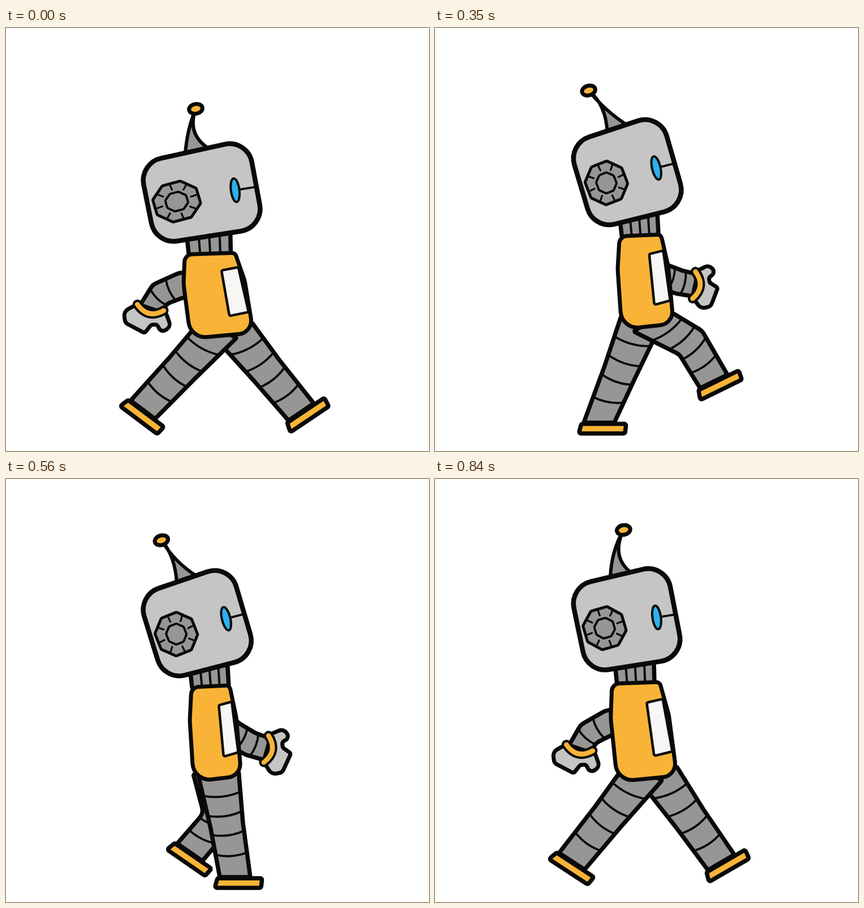
Recreate the animation shown at these times as an HTML page with a canvas. Size 748x748 px, loop 910 ms.

```html
<!DOCTYPE html>
<html lang="en">
<head>
<meta charset="utf-8">
<title>Walking robot</title>
<style>
html, body { margin: 0; width: 100%; height: 100%; overflow: hidden; background: #fff; }
canvas { display: block; width: 100vw; height: 100vh; }
</style>
</head>
<body>
<canvas id="stage" width="748" height="748"></canvas>
<script>
const ctx = document.getElementById('stage').getContext('2d');
const INK = '#090909', STEEL = '#969695', LIGHT = '#c5c5c4',
      ORANGE = '#f9b437', PAPER = '#f7f6f5', BLUE = '#2cb1ef';
const BONE = 80, GROUND = 690, LOOP = 910;

// ---- key poses: head x, y, tilt; antenna sway; hip height; wrist x, y, direction; ankles ----

const contactLow = { head: [346, 293, -10.5], wide: 1.12, sway: -4, hip: 544,
                     wrist: [255, 497, 103], near: [242, 675], far: [522, 679] };
const passBack = { head: [337, 266, -9.5], wide: .98, sway: -7, hip: 530,
                   wrist: [306, 496, 90], near: [318, 658], far: [399, 703] };
const reachNear = { head: [340, 257, -16], wide: .98, sway: -25, hip: 528,
                    wrist: [461, 455, 6], near: [493, 625], far: [290, 698] };
const passFront = { head: [338, 257, -16.5], wide: .98, sway: -23, hip: 530,
                    wrist: [463, 478, 10], near: [405, 704], far: [325, 660] };
const reachFar = { head: [341, 248, -11], wide: 1, sway: -10, hip: 526,
                   wrist: [306, 482, 95], near: [284, 698], far: [490, 622] };
const contactHigh = { head: [339, 250, -11], wide: 1, sway: -2, hip: 530,
                      wrist: [255, 478, 103], near: [242, 676], far: [506, 678] };

// ---- poses between them ----

function mix(a, b, k) {
  if (typeof a === 'number') return a + (b - a) * k;
  if (Array.isArray(a)) return a.map((v, i) => mix(v, b[i], k));
  return Object.fromEntries(Object.keys(a).map(key => [key, mix(a[key], b[key], k)]));
}

const raise = (pose, dy) => ({ ...pose, head: [pose.head[0], pose.head[1] - dy, pose.head[2]] });
const swing = [376, 660];

const liftNear = { ...raise(mix(passBack, reachNear, .5), 13), near: swing };
const contactFront = { ...mix(contactLow, passFront, .35), wrist: passFront.wrist,
                       near: [515, 681], far: [256, 681] };
const liftFar = { ...raise(mix(passFront, reachFar, .5), 14), far: swing };

// each pose with the time at which it ends
const WALK = [[140, contactLow], [210, passBack], [350, liftNear], [420, reachNear],
              [560, contactFront], [630, passFront], [770, liftFar], [840, reachFar], [LOOP, contactHigh]];

// ---- geometry ----

const rad = deg => deg * Math.PI / 180;
const angle = ([ax, ay], [bx, by]) => Math.atan2(by - ay, bx - ax) * 180 / Math.PI;
const distance = ([ax, ay], [bx, by]) => Math.hypot(bx - ax, by - ay);

// point at an offset along and to the right (clockwise side) of a direction
function offset([x, y], deg, ahead, side = 0) {
  const c = Math.cos(rad(deg)), s = Math.sin(rad(deg));
  return [x + ahead * c - side * s, y + ahead * s + side * c];
}

// point on a polyline, one unit of t per segment
function along(pts, t) {
  const i = Math.min(pts.length - 2, Math.floor(t));
  return mix(pts[i], pts[i + 1], t - i);
}

// ---- drawing helpers ----

function ink(width, color = INK) {
  ctx.strokeStyle = color;
  ctx.lineWidth = width;
  ctx.stroke();
}

function fillInk(color, width) {
  ctx.fillStyle = color;
  ctx.fill();
  ink(width);
}

function line(a, b, width, bend = (mix(a, b, .5))) {
  ctx.beginPath();
  ctx.moveTo(...a);
  ctx.quadraticCurveTo(...bend, ...b);
  ink(width);
}

// closed polygon with rounded corners; r is one radius or one per corner
function shape(pts, r, color, width) {
  const n = pts.length;
  ctx.beginPath();
  ctx.moveTo(...mix(pts[n - 1], pts[0], .5));
  pts.forEach((p, i) => ctx.arcTo(...p, ...pts[(i + 1) % n], r[i] ?? r));
  ctx.closePath();
  fillInk(color, width);
}

function oval([x, y], rx, ry, deg, color, width) {
  ctx.beginPath();
  ctx.ellipse(x, y, rx, ry, rad(deg), 0, 2 * Math.PI);
  fillInk(color, width);
}

// tube through joints { at, dir, half }, with curved bands across it
function limb(joints, bands) {
  const left = joints.map(j => offset(j.at, j.dir, 0, j.half));
  const right = joints.map(j => offset(j.at, j.dir, 0, -j.half));
  const end = joints.length - 1;
  const radii = [...left, ...right].map((_, i) => i % (end + 1) % end ? 20 : 2);
  shape([...left, ...right.reverse()], radii, STEEL, 7.5);
  right.reverse();
  for (const t of bands) {
    const a = along(left, t), b = along(right, t);
    line(a, b, 3.8, offset(mix(a, b, .5), angle(a, b), 0, distance(a, b) * .15));
  }
}

// ---- body parts ----

function leg(hip, ankle, spread) {
  const top = [mix(hip[0], ankle[0], spread), hip[1] - 10];
  const reach = distance(top, ankle);
  const bend = Math.sqrt(Math.max(0, BONE ** 2 - reach ** 2 / 4));
  const knee = offset(mix(top, ankle, .5), angle(top, ankle), 0, -bend);
  const thigh = angle(top, knee), shin = angle(knee, ankle);
  const pitch = ankle[1] > GROUND ? 0 : (shin - 90) * .85;
  limb([{ at: top, dir: (thigh + 90) / 2, half: 36 },
        { at: knee, dir: (thigh + shin) / 2, half: 29 },
        { at: ankle, dir: pitch + 90, half: 27 }], [.4, .78, 1.15, 1.55]);
  const sole = [[-31, 2], [48, 2], [46, 19], [-36, 19]];
  shape(sole.map(([x, y]) => offset(ankle, pitch, x, y)), 3, ORANGE, 7.5);
}

function arm(shoulder, [x, y, dir]) {
  const wrist = [x, y], reach = distance(shoulder, wrist);
  const elbow = offset(wrist, dir, -.4 * reach);
  const joints = [0, 1, 2, 3].map(i => {
    const a = mix(shoulder, elbow, i / 3), b = mix(elbow, wrist, i / 3);
    return { at: mix(a, b, i / 3), dir: angle(a, b), half: 23 - i };
  });
  limb(joints, [.85, 1.5, 2.2]);

  const size = .5 + .004 * reach;
  const claw = [[-4, 24], [15, 45], [34, 38], [44, 0], [27, -8], [24, -18], [37, -29], [22, -43], [2, -30]];
  shape(claw.map(([v, u]) => offset(wrist, dir, v * size, u * size)),
        [6, 13, 10, 4, 6, 6, 8, 11, 6], LIGHT, 7);

  const a = offset(wrist, dir, -3, 24), b = offset(wrist, dir, -3, -24);
  const bend = offset(wrist, dir, 19);
  line(a, b, 17, bend);
  line(a, b, 8.5, bend);
  ink(8.5, ORANGE);
}

function antenna(wide, tall, lean) {
  const tip = offset([0, 0], lean - 90, 160 * tall);
  const rootX = -4 * wide, rootY = -118 * tall;
  ctx.beginPath();
  ctx.moveTo(-14 * wide, -80 * tall);
  ctx.quadraticCurveTo(rootX + 1, rootY - 8, ...tip);
  ctx.quadraticCurveTo(rootX - 3, rootY + 3, 25 * wide, -80 * tall);
  fillInk(STEEL, 6);
  oval(tip, 12, 8.5, 0, ORANGE, 7);
}

function ear(x, y, rx, ry) {
  const at = (i, k) => [x + rx * k * Math.cos(i * Math.PI / 4 + .3), y + ry * k * Math.sin(i * Math.PI / 4 + .3)];
  const sides = [...Array(8).keys()];
  shape(sides.map(i => at(i, 1)), 3, STEEL, 5);
  for (const i of sides) line(at(i + .4, .62), at(i + .4, .84), 3.2);
  shape(sides.map(i => at(i, .48)), 4, STEEL, 4);
}

function head(x, y, tilt, wide, tall, sway) {
  ctx.save();
  ctx.translate(x, y);
  ctx.rotate(rad(tilt));
  antenna(wide, tall, sway - tilt);
  const box = [[-88, -78], [87, -85], [87, 84], [-86, 78]];
  shape(box.map(([u, v]) => [u * wide, v * tall]), 40, LIGHT, 8.5);
  ear(-41 * wide, 6 * tall, 38.5 * wide, 38.5 * tall);
  const eye = [53 * wide, 5 * tall];
  line(eye, [84 * wide, 6 * tall], 3.8);
  oval(eye, 7.5, 21, 3, BLUE, 4);
  ctx.restore();
}

function robot({ head: [x, y, tilt], wide, sway, hip: hipY, wrist, near, far }) {
  const tall = 1.5 - .5 * wide;
  const skull = (u, v) => offset([x, y], tilt, u * wide, v * tall);
  const [chinX, chinY] = skull(0, 79);
  const collar = [chinX + 1, chinY + 33], hip = [x + 36, hipY];

  // long strides widen the torso
  const girth = 84 + 27 * ((near[0] - far[0]) / 280) ** 4;
  const torso = (u, v) => {
    const [cx, cy] = mix(collar, hip, v);
    return [cx + (u - .5) * girth * mix(.8, 1, v), cy - (u - .5) * mix(3, 10, v)];
  };

  arm(torso(.5, .35), wrist);
  leg(hip, far, .14);
  leg(hip, near, .05);

  const jaw = [skull(-35, 70), skull(35, 70)];
  const base = [-33, 33].map(u => [collar[0] + u * wide, collar[1] + 3 - u * .05]);
  shape([...jaw, base[1], base[0]], 4, STEEL, 7.5);
  for (const k of [.27, .51, .75]) line(mix(...jaw, k), mix(...base, k), 4);

  const outline = [[0, 0], [1, 0], [1.06, .35], [1, 1], [0, 1], [-.06, .35]];
  shape(outline.map(p => torso(...p)), [14, 8, 60, 24, 30, 90], ORANGE, 7);
  const plate = [[.67, .21], [1, .18], [1, .74], [.67, .77]];
  shape(plate.map(p => torso(...p)), 3, PAPER, 4.5);

  head(x, y, tilt, wide, tall, sway);
}

function draw() {
  const now = performance.now() % LOOP;
  ctx.fillStyle = '#fff';
  ctx.fillRect(0, 0, 748, 748);
  ctx.lineJoin = ctx.lineCap = 'round';
  robot(WALK.find(([end]) => now < end)[1]);
  requestAnimationFrame(draw);
}
draw();
</script>
</body>
</html>
```
